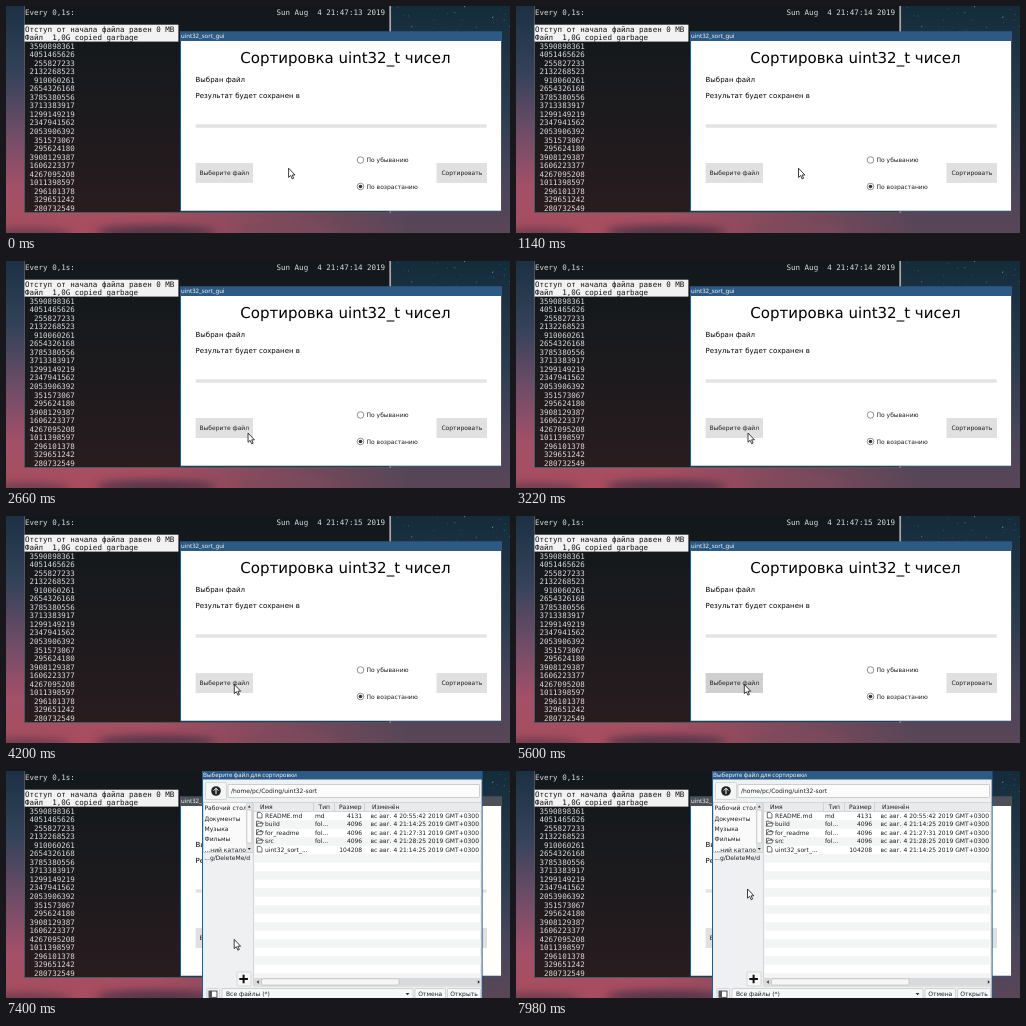
Write an HTML page that moves like this. It is 504 px wide and 227 px high and loops after 8000 ms.

```html
<!DOCTYPE html>
<html lang="ru">
<head>
<meta charset="utf-8">
<title>uint32_sort_gui</title>
<style>
html, body { margin: 0; width: 100%; height: 100%; overflow: hidden; background: #1d2638; }
svg { display: block; width: 504px; height: 227px; }
text { font: 6px "DejaVu Sans", sans-serif; fill: #1c1e20; white-space: pre; text-rendering: geometricPrecision; }
.mono text { font: 7.52px "DejaVu Sans Mono", monospace; fill: #dcdcdc; }
.mono .inv { fill: #111; }
.title { font: 6px "Noto Sans", sans-serif; fill: #f4f6f8; }
.head { font-size: 15px; fill: #000; }
.label { font-size: 7px; fill: #000; }
</style>
</head>
<body>
<svg viewBox="0 0 504 227">
  <defs>
    <linearGradient id="sky" x2="0" y2="1">
      <stop offset="0" stop-color="#1b3143"/>
      <stop offset=".3" stop-color="#35435a"/>
      <stop offset=".55" stop-color="#6d4c66"/>
      <stop offset=".8" stop-color="#a35068"/>
      <stop offset="1" stop-color="#a84d5e"/>
    </linearGradient>
    <linearGradient id="dusk" x2="0" y2="1">
      <stop offset="0" stop-color="#132c3a"/>
      <stop offset=".45" stop-color="#2a3c4f"/>
      <stop offset=".75" stop-color="#48455a"/>
      <stop offset="1" stop-color="#594657"/>
    </linearGradient>
    <linearGradient id="fade">
      <stop offset=".3" stop-color="#000"/>
      <stop offset=".8" stop-color="#fff"/>
    </linearGradient>
    <mask id="east"><rect width="504" height="227" fill="url(#fade)"/></mask>
    <linearGradient id="glass" x2="0" y2="1">
      <stop offset="0" stop-color="#11181b"/>
      <stop offset=".5" stop-color="#1b1a1d"/>
      <stop offset="1" stop-color="#291c1f"/>
    </linearGradient>
    <filter id="soft" x="-30%" y="-80%" width="160%" height="260%"><feGaussianBlur stdDeviation="4"/></filter>
    <clipPath id="places"><rect x="197" y="32" width="43" height="49"/></clipPath>
    <clipPath id="recent"><rect x="197" y="82" width="49" height="12"/></clipPath>
  </defs>

  <rect width="504" height="227" fill="url(#sky)"/>
  <rect width="504" height="227" fill="url(#dusk)" mask="url(#east)"/>
  <g filter="url(#soft)">
    <ellipse cx="150" cy="226" rx="60" ry="7" fill="#55364a"/>
    <ellipse cx="20" cy="228" rx="45" ry="6" fill="#6d3d50"/>
    <ellipse cx="280" cy="224" rx="50" ry="5" fill="#7a4b5c"/>
  </g>
  <g id="stars" fill="#b9c4d8"></g>

  <g class="mono">
    <rect x="18.5" y="-2" width="365" height="208.5" fill="url(#glass)" stroke="#50565c"/>
    <path d="M384.3 0V206.5" stroke="#a3a8ab" stroke-width="1.5"/>
    <rect x="18.5" y="18.7" width="153.9" height="16.9" fill="#f2f2f2"/>
    <g id="term"></g>
    <text id="clock" x="270.5" y="8.7"></text>
  </g>

  <g id="app">
    <rect x="174" y="25.5" width="322" height="180" fill="#2d5a84"/>
    <rect id="bar" x="174" y="25.5" width="322" height="9.5" fill="#2d5a84"/>
    <rect x="175" y="35" width="320" height="169.7" fill="#fff"/>
    <text class="title" x="175" y="32.2">uint32_sort_gui</text>
    <text class="head" x="234.3" y="56.6">Сортировка uint32_t чисел</text>
    <text class="label" x="189.5" y="76.4">Выбран файл</text>
    <text class="label" x="189.5" y="92.3">Результат будет сохранен в</text>
    <rect x="189.7" y="118.3" width="291" height="3.4" fill="#e3e3e3"/>
    <rect id="pick" x="189.6" y="157" width="57.4" height="20" fill="#e0e0e0"/>
    <text x="218.3" y="169.2" text-anchor="middle">Выберите файл</text>
    <rect x="430.5" y="157" width="50.5" height="20" fill="#e0e0e0"/>
    <text x="455.8" y="169.2" text-anchor="middle">Сортировать</text>
    <g fill="#fff" stroke="#777" stroke-width=".8">
      <circle cx="354.5" cy="154" r="3.3"/>
      <circle cx="354.5" cy="180.5" r="3.3"/>
    </g>
    <circle cx="354.5" cy="180.5" r="1.8" fill="#333"/>
    <text x="360.5" y="156">По убыванию</text>
    <text x="360.5" y="182.6">По возрастанию</text>
  </g>

  <g id="dialog">
    <rect x="196" y="-1" width="280.6" height="232" fill="#2d5a84"/>
    <rect x="197" y="8.5" width="278.6" height="222" fill="#eff0f1"/>
    <text class="title" x="197" y="6.2">Выберите файл для сортировки</text>

    <rect x="199.5" y="11.5" width="21" height="17" rx="1" fill="#f4f5f5" stroke="#c3c5c7" stroke-width=".6"/>
    <circle cx="210" cy="20" r="4.8" fill="#222"/>
    <path d="M210 23V17.4M207.6 19.6L210 17.2L212.4 19.6" fill="none" stroke="#fff"/>
    <rect x="222" y="13.5" width="251.5" height="13" rx="1" fill="#fcfcfc" stroke="#b9bbbd" stroke-width=".7"/>
    <text x="225" y="22.3">/home/pc/Coding/uint32-sort</text>

    <rect x="197.3" y="31.5" width="49.4" height="49.8" fill="#fafafa" stroke="#bbb" stroke-width=".6"/>
    <g id="side" clip-path="url(#places)"></g>
    <rect x="240" y="32" width="6.5" height="49" fill="#e2e3e4"/>
    <rect x="240.8" y="39" width="5" height="33" rx="1" fill="#fbfbfb" stroke="#aaa" stroke-width=".5"/>
    <path d="M241.8 36.5L243.3 34.5L244.8 36.5ZM241.8 77L243.3 79L244.8 77Z" fill="#333"/>
    <text x="198.2" y="88.8" clip-path="url(#recent)">...g/DeleteMe/d</text>
    <rect x="231" y="201" width="14" height="14" rx="1" fill="#f6f6f6" stroke="#c3c5c7" stroke-width=".6"/>
    <path d="M237.6 203.7V212.3M233.3 208H241.9" stroke="#111" stroke-width="2"/>

    <rect x="247.8" y="31.5" width="227.2" height="183.5" fill="#fff" stroke="#b5b7b9" stroke-width=".6"/>
    <g id="stripes" fill="#f3f4f4"></g>
    <rect x="248.1" y="31.8" width="226.6" height="8.6" fill="#e9eaeb"/>
    <path d="M248 40.5H475M307.5 32V40M328.5 32V40M358.5 32V40" stroke="#bfc1c3" stroke-width=".6"/>
    <g id="files"></g>
    <rect x="248.1" y="207" width="226.6" height="7.7" fill="#d9dadb"/>
    <rect x="255.5" y="207.8" width="137.5" height="6.2" rx="1" fill="#f6f6f6" stroke="#aaa" stroke-width=".5"/>
    <path d="M252.8 209.3L250.6 211L252.8 212.7ZM471.8 209.3L474 211L471.8 212.7Z" fill="#333"/>

    <g fill="#f6f7f7" stroke="#b9bbbd" stroke-width=".6">
      <rect x="201" y="217.5" width="12.5" height="12" rx="1"/>
      <rect x="216" y="217.5" width="191" height="12" rx="1"/>
      <rect x="409" y="217.5" width="30.5" height="12" rx="1"/>
      <rect x="441.5" y="217.5" width="33" height="12" rx="1"/>
    </g>
    <rect x="203" y="220" width="8" height="6.3" fill="#fff" stroke="#222" stroke-width=".8"/>
    <path d="M203 220H206V226.3H203Z" fill="#555"/>
    <path d="M399.5 222H403.5L401.5 224.2Z" fill="#333"/>
    <text x="220" y="225.3">Все файлы (*)</text>
    <text x="424.3" y="225.3" text-anchor="middle">Отмена</text>
    <text x="458" y="225.3" text-anchor="middle">Открыть</text>
  </g>

  <path id="cursor" d="M0 0V9.2L2.1 7.3L3.6 10.7L5.1 10.1L3.6 6.8H6.4Z" fill="#fff" stroke="#111" stroke-width=".8" stroke-linejoin="round"/>
</svg>
<script>
const $ = id => document.getElementById(id);
const LOOP = 8000, PRESS = 5600, OPEN = 5880;

function add(parent, tag, attrs, content = '') {
  const el = document.createElementNS('http://www.w3.org/2000/svg', tag);
  for (const key in attrs) el.setAttribute(key, attrs[key]);
  el.textContent = content;
  $(parent).append(el);
}
const write = (parent, x, y, s, attrs) => add(parent, 'text', { x, y, ...attrs }, s);

let seed = 11;
const rand = () => (seed = seed * 16807 % 2147483647) / 2147483647;
for (let i = 0; i < 26; i++) {
  add('stars', 'circle', { cx: 386 + rand() * 118, cy: rand() * 26, r: .25 + rand() * .3, opacity: .3 + rand() * .5 });
}

const numbers = `3590898361 4051465626 255827233 2132268523 910060261 2654326168 3785380556
3713383917 1299149219 2347941562 2053906392 351573067 295624180 3908129387 1606223377
4267095208 1011398597 296101378 329651242 280732549`.split(/\s+/);
const lines = ['Every 0,1s:', '', 'Отступ от начала файла равен 0 MB', 'Файл  1,0G copied garbage',
  ...numbers.map(n => n.padStart(11))];
lines.forEach((s, i) => write('term', 19, 8.7 + i * 8.52, s, { class: i == 2 || i == 3 ? 'inv' : '' }));

['Рабочий стол', 'Документы', 'Музыка', 'Фильмы', '...ний каталог']
  .forEach((s, i) => write('side', 198.5, 39.2 + i * 10.4, s));

for (let y = 49.2; y < 205; y += 17) add('stripes', 'rect', { x: 248.1, y, width: 226.6, height: 8.5 });
[['Имя', 254], ['Тип', 312.5], ['Размер', 333], ['Изменён', 366]]
  .forEach(([s, x]) => write('files', x, 38.3, s));
[
  ['README.md', 'md', '4131', '20:55:42'],
  ['build', 'fol...', '4096', '21:14:25'],
  ['for_readme', 'fol...', '4096', '21:27:31'],
  ['src', 'fol...', '4096', '21:28:25'],
  ['uint32_sort_...', '', '104208', '21:14:25']
].forEach(([name, type, size, time], i) => {
  const y = 46.7 + i * 8.5, folder = type == 'fol...';
  add('files', 'path', {
    d: folder ? `M250.5 ${y}V${y - 5}H253L254 ${y - 4}H256V${y - 3}M250.5 ${y}L252 ${y - 3}H257.3L255.8 ${y}Z`
              : `M251.3 ${y + .3}V${y - 5.3}H254.3L256 ${y - 3.6}V${y + .3}Z`,
    fill: '#fff', stroke: '#333', 'stroke-width': .7
  });
  write('files', 259, y, name);
  write('files', 309, y, type);
  write('files', 356.2, y, size, { 'text-anchor': 'end' });
  write('files', 364.5, y, `вс авг. 4 ${time} 2019 GMT+0300`);
});

// time, x, y of the pointer tip
const path = [
  [0, 282.6, 162.2], [1120, 282.6, 162.2], [1240, 282, 162.2], [2099, 282, 162.2],
  [2100, 265.4, 170.8], [2400, 249, 172.2], [2820, 237.8, 172], [2920, 237.5, 171.8],
  [3220, 232, 172], [3500, 230.6, 171.8], [3640, 230.6, 171.4], [3660, 230.4, 170.8],
  [3800, 230.4, 170.8], [3920, 229.2, 169.6], [4060, 229.2, 169.6], [4200, 228.3, 168.4],
  [7399, 228.3, 168.4], [7400, 228.2, 168.4], [7560, 228.2, 168.4],
  [7700, 228.6, 156], [7860, 230.6, 129], [7980, 231.5, 118], [LOOP, 231.5, 118]
];
function tip(t) {
  const i = path.findIndex(p => p[0] > t);
  const [t0, x0, y0] = path[i - 1], [t1, x1, y1] = path[i];
  const k = (t - t0) / (t1 - t0);
  return [x0 + (x1 - x0) * k, y0 + (y1 - y0) * k];
}

function draw(t) {
  const open = t >= OPEN;
  $('cursor').setAttribute('transform', `translate(${tip(t)})`);
  $('clock').textContent = `Sun Aug  4 21:47:${t < 1140 ? 13 : t < 3840 ? 14 : 15} 2019`;
  $('pick').setAttribute('fill', t >= PRESS && !open ? '#cfcfcf' : '#e0e0e0');
  $('bar').setAttribute('fill', open ? '#4b5157' : '#2d5a84');
  $('dialog').style.display = open ? '' : 'none';
}

const start = performance.now();
function tick() {
  draw((performance.now() - start) % LOOP);
  requestAnimationFrame(tick);
}
tick();
</script>
</body>
</html>
```
